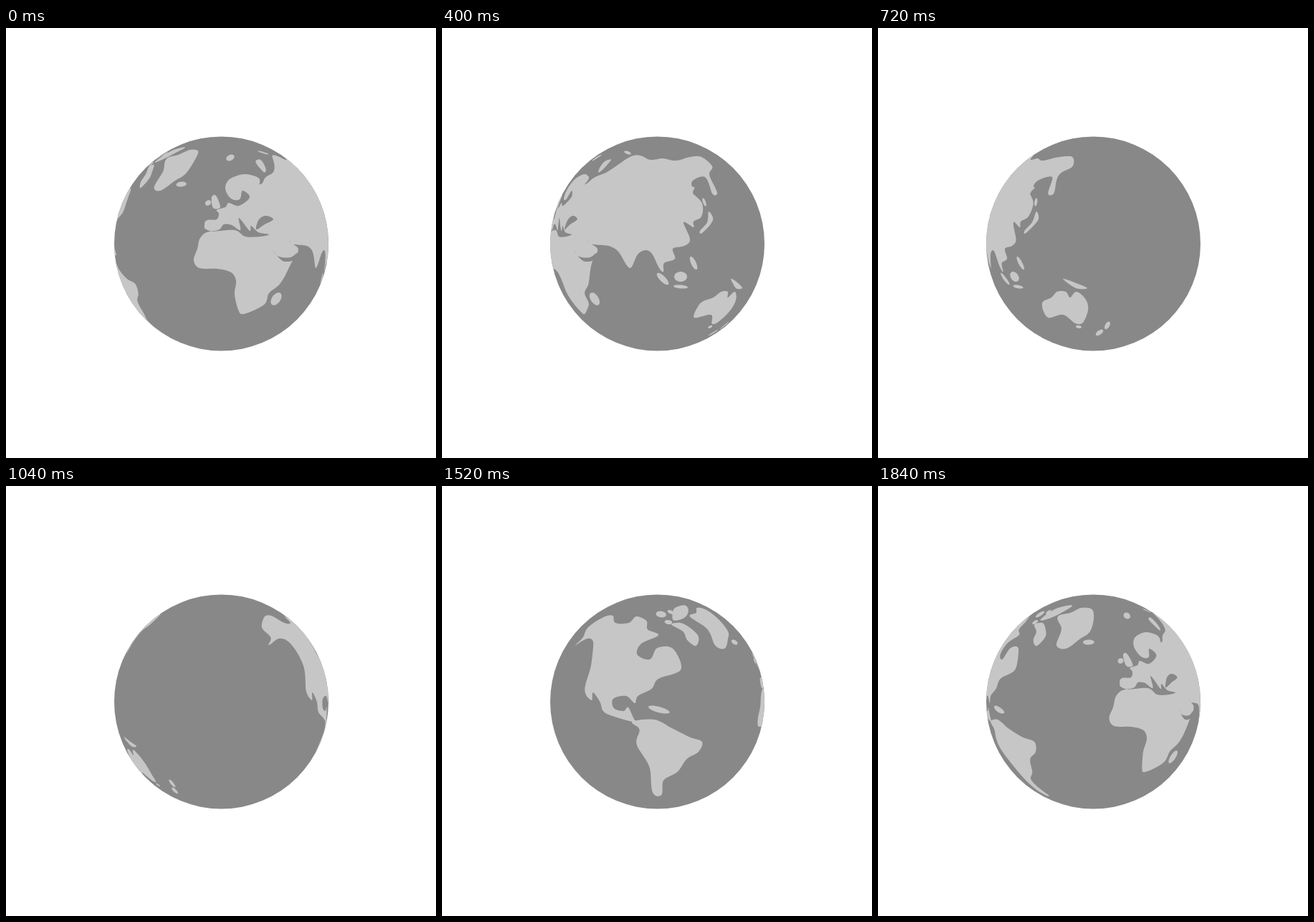
An HTML page with a canvas that plays this animation: 600x600 px, repeating every 1.92 s.

```html
<!DOCTYPE html>
<html lang="en">
<head>
<meta charset="utf-8">
<title>Turning globe</title>
<style>
  html, body { margin: 0; width: 100%; height: 100%; overflow: hidden; background: #fff; }
  canvas { display: block; width: 600px; height: 600px; }
</style>
</head>
<body>
<canvas id="globe" width="600" height="600"></canvas>
<script>
const CX = 300.5, CY = 301, R = 149.5;
const OCEAN = '#888888', LAND = '#c6c6c6';
const LOOP = 1920, STEP = 80;

// Turn of the globe in degrees at certain steps; the map repeats after TURN.
const TURN = 383.4;
const SPIN = [[0, 0], [5, 80], [9, 144], [13, 201], [17, 265], [21, 328], [23, 359.7], [24, TURN]];
const [AFRICA, ASIA, PACIFIC, , AMERICA, ATLANTIC, GREENLAND] = SPIN.map(s => s[1]);

const rad = Math.PI / 180;
const clamp = (v, m) => Math.max(-m, Math.min(m, v));
const rowRadius = y => Math.sqrt(Math.max(0, R * R - (y - CY) ** 2));
const shapes = [];

// Outline as seen from a given turn -> smooth closed curve of [longitude, y].
function trace(view, flat, fill = LAND) {
  const pts = [];
  for (let i = 0; i < flat.length; i += 2) {
    const y = flat[i + 1];
    const s = clamp((flat[i] - CX) / rowRadius(y), 1);
    pts.push([view + Math.asin(s) / rad, y]);
  }
  const n = pts.length, curve = [];
  const mid = pts.reduce((sum, p) => sum + p[0], 0) / n;
  for (let i = 0; i < n; i++) {
    const [a, b, c, d] = [-1, 0, 1, 2].map(k => pts[(i + k + n) % n]);
    for (let t = 0; t < 1; t += 0.125) {
      const [lon, y] = [0, 1].map(k => b[k] + 0.5 * t * (c[k] - a[k] +
        t * (2 * a[k] - 5 * b[k] + 4 * c[k] - d[k] +
        t * (3 * (b[k] - c[k]) + d[k] - a[k]))));
      curve.push([lon - mid, y]);
    }
  }
  shapes.push({ mid, fill, curve });
}

// Small oval island, tilted by an angle in degrees.
function island(view, x, y, rx, ry, tilt = 0) {
  const c = Math.cos(tilt * rad), s = Math.sin(tilt * rad), flat = [];
  for (let a = 0; a < 360; a += 45) {
    const u = rx * Math.cos(a * rad), v = ry * Math.sin(a * rad);
    flat.push(x + u * c - v * s, y + u * s + v * c);
  }
  trace(view, flat);
}

// Africa and Arabia
trace(AFRICA, [284,284, 271,293, 267,308, 262,324, 270,335, 295,336, 314,341, 321,353, 319,372,
  324,393, 332,399, 360,386, 367,370, 383,356, 398,328, 408,309, 397,299, 390,288, 345,290,
  319,283]);

// Europe
trace(AFRICA, [284,283, 277,274, 281,268, 294,267, 297,259, 294,254, 306,250, 311,244, 325,248,
  340,236, 330,227, 326,239, 314,238, 306,224, 312,211, 332,204, 352,209, 353,219, 346,221,
  357,217, 366,210, 402,240, 403,285, 340,293]);

// Northern Asia
trace(ASIA, [206,215, 232,200, 262,180, 277,178, 291,184, 308,182, 326,185, 346,180, 362,180,
  377,193, 373,205, 384,230, 377,231, 367,208, 349,214, 350,231, 340,245, 200,260]);

// Southern Asia
trace(ASIA, [340,222, 350,231, 363,245, 362,263, 351,270, 351,278, 337,271, 346,295, 338,304,
  322,308, 325,322, 310,328, 309,340, 303,335, 293,315, 284,310, 273,316, 262,335, 246,312,
  232,304, 212,302, 204,297, 198,250]);

// Mediterranean, Black Sea, Red Sea
trace(AFRICA, [287,284, 298,281, 304,274, 315,275, 327,282, 325,265, 340,283, 342,276, 352,285,
  367,288, 355,291, 334,291, 319,282], OCEAN);
trace(AFRICA, [349,281, 353,267, 363,262, 373,267, 361,274], OCEAN);
trace(AFRICA, [373,311, 381,319, 397,320, 406,314, 401,324, 386,325], OCEAN);

// Islands around Europe and Africa
trace(AFRICA, [287,236, 293,234, 299,250, 289,251]);
island(AFRICA, 282, 244, 4.5, 3.5, -35);
island(AFRICA, 377, 378, 6, 10, 35);
island(AFRICA, 313, 181, 6, 4, -25);

// Islands around Asia
trace(ASIA, [218,201, 226,187, 236,184, 225,197]);
trace(ASIA, [372,256, 378,268, 363,286, 360,283, 370,271]);
island(ASIA, 259, 174, 5, 2, 20);
island(ASIA, 366, 243, 2, 6, -20);
island(ASIA, 351, 328, 3.5, 10, -25);
island(ASIA, 333, 347, 9, 7);
island(ASIA, 308, 350, 11, 4, 45);
island(ASIA, 333, 361, 10, 2.5, 5);

// Australia and neighbours
trace(PACIFIC, [229,384, 242,376, 250,368, 262,368, 268,376, 277,368, 290,379, 293,394, 286,411,
  275,412, 258,400, 237,404]);
trace(PACIFIC, [258,350, 274,355, 292,363, 276,363]);
island(PACIFIC, 280, 417, 4, 2, 10);
island(PACIFIC, 309, 425, 6, 3, -35);
island(PACIFIC, 320, 415, 3, 6, 30);

// North America
trace(AMERICA, [232,222, 243,211, 243,197, 264,183, 281,181, 294,191, 315,191, 320,182, 338,188,
  346,200, 363,208, 346,220, 345,235, 363,242, 368,226, 386,227, 401,256, 378,269, 371,283,
  354,293, 350,303, 338,293, 319,297, 320,310, 334,314, 341,309, 349,327, 357,332, 324,323,
  304,315, 298,301, 286,288, 284,299, 271,285, 277,250, 270,219, 254,213]);
island(AMERICA, 380, 312, 13, 4, 18);

// South America
trace(ATLANTIC, [196,329, 220,326, 243,338, 268,350, 289,357, 287,371, 273,381, 267,399, 255,411,
  267,431, 254,428, 230,393, 206,361, 205,340]);

// Arctic
trace(ATLANTIC, [264,193, 281,192, 295,208, 286,223, 276,215, 275,203]);
trace(ATLANTIC, [270,187, 284,171, 307,167, 290,183]);
island(ATLANTIC, 260, 179, 7, 4, -20);
island(ATLANTIC, 262, 190, 5, 3, -10);
island(ATLANTIC, 275, 176, 4, 3);
island(ATLANTIC, 360, 218, 7, 3.5, 5);
trace(GREENLAND, [251,182, 268,177, 284,170, 300,174, 297,201, 281,214, 262,227, 249,222,
  256,199]);

const ctx = document.getElementById('globe').getContext('2d');

function turnAt(step) {
  const i = SPIN.findIndex(s => s[0] > step);
  const [s0, a0] = SPIN[i - 1], [s1, a1] = SPIN[i];
  return a0 + (a1 - a0) * (step - s0) / (s1 - s0);
}

function draw(turn) {
  ctx.clearRect(0, 0, 600, 600);
  ctx.save();
  ctx.beginPath();
  ctx.arc(CX, CY, R, 0, 2 * Math.PI);
  ctx.fillStyle = OCEAN;
  ctx.fill();
  ctx.clip();
  for (const { mid, fill, curve } of shapes) {
    const away = mid - turn;
    const base = away - TURN * Math.round(away / TURN);
    ctx.beginPath();
    // Points behind the globe slide along its rim.
    for (const [lon, y] of curve) {
      ctx.lineTo(CX + rowRadius(y) * Math.sin(clamp(base + lon, 90) * rad), y);
    }
    ctx.fillStyle = fill;
    ctx.fill();
  }
  ctx.restore();
}

function tick() {
  draw(turnAt(Math.floor(performance.now() % LOOP / STEP)));
  requestAnimationFrame(tick);
}
tick();
</script>
</body>
</html>
```
